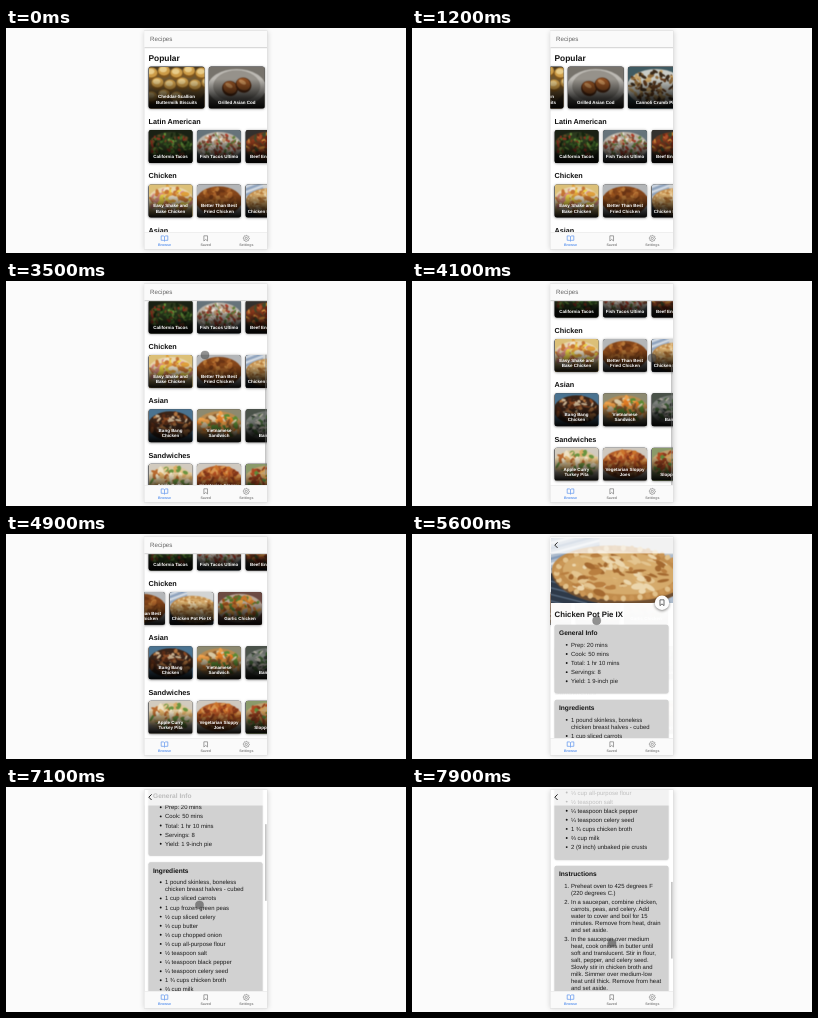
Write an HTML page with a canvas that moves like this. It is 400 px wide and 225 px high and loops after 8000 ms.

```html
<!DOCTYPE html>
<html lang="en">
<head>
<meta charset="utf-8">
<title>Recipes</title>
<style>
html, body { margin: 0; width: 100%; height: 100%; overflow: hidden; background: #fbfbfb; }
canvas { display: block; width: 400px; height: 225px; }
</style>
</head>
<body>
<canvas id="stage"></canvas>
<script>
const canvas = document.getElementById('stage');
const ratio = window.devicePixelRatio || 1;
canvas.width = 400 * ratio;
canvas.height = 225 * ratio;
let g = canvas.getContext('2d');
const FONT = '"Liberation Sans", Arial, sans-serif';
const LOOP = 8000, STEP = 100;
const LEFT = 138.5, TOP = 3, WIDTH = 122.5, BOTTOM = 204;

// label, backdrop, plate, piece size, food colours
const popular = [
  ['Cheddar-Scallion|Buttermilk Biscuits', '#4b3a20', '#6f5630', 'biscuits'],
  ['Grilled Asian Cod', '#77736c', '#bdbab4', 'cod'],
  ['Cannoli Crumb Pie', '#3f5a61', '#c9ccc6', 4, '#5f3a1c', '#8f6a3a', '#3a2a1a', '#c8a468'],
  ['French Onion Meatballs', '#41659a', '#d3d6d8', 7, '#dcc6a0', '#b48a5a', '#eceae2', '#a08060', '#cfd0cf'],
  ['Pork, Black Bean, and|Rice Casserole', '#55523e', '#8a6434', 2.4, '#e8bd3c', '#a8321f', '#5d7d2c', '#e0d2ac', '#2c1c14', '#d0802e']
];
const rows = [
  ['Latin American', [
    ['California Tacos', '#1a2114', '#2c3a1e', 3.2, '#2a4c1c', '#69963c', '#8f2c1e', '#6b4422', '#16240f', '#3d6526'],
    ['Fish Tacos Ultimo', '#66737a', '#b9b3a8', 3, '#e6e0d4', '#b03c28', '#62803c', '#c29a72', '#7f4a36'],
    ['Beef Enchiladas', '#33302e', '#6e3a20', 4, '#b0502a', '#d8903c', '#6b2414', '#3f4a2a', '#8f3a1c']
  ]],
  ['Chicken', [
    ['Easy Shake and|Bake Chicken', '#dcc078', '#e8d6ae', 5, '#dfa03c', '#c47434', '#ecd448', '#d98a80', '#efe4cc'],
    ['Better Than Best|Fried Chicken', '#b4b6b8', '#84451a', 5, '#8a4a1c', '#a9622a', '#6a3414', '#b87838', '#9a541e'],
    ['Chicken Pot Pie IX', '#56719a', '', 'pie'],
    ['Garlic Chicken', '#6b4a42', '#b9a89a', 4, '#c9762c', '#d99a45', '#9a4d1c', '#567a32']
  ]],
  ['Asian', [
    ['Bang Bang|Chicken', '#4a7390', '#3a2418', 4, '#8a4a24', '#b07440', '#5a2c16', '#c8b090', '#40281c'],
    ['Vietnamese|Sandwich', '#8d8a70', '#b88a50', 5, '#e07a24', '#eea04a', '#8a5a2c', '#d8c8a4', '#5a8a34'],
    ['Banh Mi', '#4a5249', '#7b7f7a', 4, '#3c5a32', '#6a6f6a', '#a9a59a', '#2c332c']
  ]],
  ['Sandwiches', [
    ['Apple Curry|Turkey Pita', '#d2cbbf', '#dcc8a0', 5, '#dcac66', '#b86a30', '#6a9440', '#efe2c4', '#e6c68c'],
    ['Vegetarian Sloppy|Joes', '#cfc9c0', '#b4602c', 4, '#b04c20', '#cc742c', '#86381a', '#d89450'],
    ['Sloppy Joes', '#8a9a6a', '#c0a070', 4, '#5f8a3a', '#b04a24', '#d09a50', '#8a3a1c']
  ]]
];
const info = ['Prep: 20 mins', 'Cook: 50 mins', 'Total: 1 hr 10 mins', 'Servings: 8', 'Yield: 1 9-inch pie'];
const ingredients = [
  '1 pound skinless, boneless|chicken breast halves - cubed', '1 cup sliced carrots',
  '1 cup frozen green peas', '½ cup sliced celery', '⅓ cup butter', '⅓ cup chopped onion',
  '⅓ cup all-purpose flour', '½ teaspoon salt', '¼ teaspoon black pepper',
  '¼ teaspoon celery seed', '1 ¾ cups chicken broth', '⅔ cup milk', '2 (9 inch) unbaked pie crusts'
];
const steps = [
  'Preheat oven to 425 degrees F|(220 degrees C.)',
  'In a saucepan, combine chicken,|carrots, peas, and celery. Add|water to cover and boil for 15|minutes. Remove from heat, drain|and set aside.',
  'In the saucepan over medium|heat, cook onions in butter until|soft and translucent. Stir in flour,|salt, pepper, and celery seed.|Slowly stir in chicken broth and|milk. Simmer over medium-low|heat until thick. Remove from heat|and set aside.',
  'Place the chicken mixture in|bottom pie crust. Pour hot liquid|mixture over.'
];

// Motion: time, value pairs
const popularX = [[400, 0], [500, 9], [800, 38], [1000, 45], [1200, 47], [1300, 49], [1600, 122], [1800, 154], [2100, 171], [2400, 176]];
const listY = [[3100, 0], [3500, 82.5], [3600, 94], [3800, 98.5]];
const chickenX = [[4100, 0], [4500, 58], [4700, 72], [4900, 76]];
const detailY = [[6700, 0], [7200, 112], [7300, 155], [7500, 200], [7600, 206], [7900, 241]];
const pointer = [
  [100, 200, 214], [400, 250, 62], [800, 206, 62], [1000, 245, 60], [1100, 270, 60], [1200, 272, 60],
  [1300, 252, 60], [1600, 172, 60], [1900, 185, 62], [2400, 189, 112], [2600, 191, 150], [2700, 193, 181],
  [2800, 195, 206], [3100, 197, 157], [3500, 199, 74], [3700, 205, 60], [4100, 240, 77], [4500, 180, 76],
  [4700, 245, 78], [4800, 270, 80], [4900, 272, 84], [5000, 256, 108], [5100, 222, 112], [5300, 186, 80],
  [5400, 186, 80], [5700, 184, 90], [6300, 178, 144], [6600, 186, 208], [7200, 195, 100], [7500, 198, 193], [7900, 200, 156]
];

function track(t, keys, k = 1) {
  if (t <= keys[0][0]) return keys[0][k];
  for (let i = 1; i < keys.length; i++) {
    const a = keys[i - 1], b = keys[i];
    if (t <= b[0]) return a[k] + (b[k] - a[k]) * (t - a[0]) / (b[0] - a[0]);
  }
  return keys[keys.length - 1][k];
}

function random(seed) {
  let s = seed * 7919 + 17;
  return () => (s = (s * 16807) % 2147483647) / 2147483647;
}

function text(str, x, y, size, color = '#111', weight = 'normal', align = 'left') {
  g.font = `${weight} ${size}px ${FONT}`;
  g.fillStyle = color;
  g.textAlign = align;
  g.fillText(str, x, y);
}

function rect(x, y, w, h, color) {
  g.fillStyle = color;
  g.fillRect(x, y, w, h);
}

function round(x, y, w, h, r) {
  g.beginPath();
  g.roundRect(x, y, w, h, r);
}

function oval(x, y, rx, ry, color, turn = 0) {
  g.beginPath();
  g.ellipse(x, y, rx, ry, turn, 0, Math.PI * 2);
  g.fillStyle = color;
  g.fill();
}

function line(points, color, width) {
  g.beginPath();
  points.forEach(([x, y]) => g.lineTo(x, y));
  g.strokeStyle = color;
  g.lineWidth = width;
  g.stroke();
}

function clipped(x, y, w, h, draw) {
  g.save();
  g.beginPath();
  g.rect(x, y, w, h);
  g.clip();
  draw();
  g.restore();
}

function shadow(blur, dy, alpha) {
  g.shadowColor = `rgba(0,0,0,${alpha})`;
  g.shadowBlur = blur * ratio;
  g.shadowOffsetY = dy * ratio;
}

function pie(w, h) {
  rect(0, 0, w, h, '#aebccd');
  for (let i = 0; i < 16; i++) {
    line([[0, h * i * .08], [w * .6, h * (i * .08 - .3)]], i % 2 ? '#dfe4ea' : '#8299b8', h * .035);
  }
  rect(w * .4, 0, w * .6, h * .25, '#d2d4d4');
  oval(0, h, w * .42, h * .45, '#2b3645', .3);
  for (let i = 0; i < 6; i++) {
    line([[0, h * (.66 + i * .1)], [w * .3, h * (.8 + i * .1)]], '#56697f', h * .02);
  }
  const cx = w * .56, cy = h * .54;
  oval(cx, cy + h * .04, w * .55, h * .45, '#6b4a2c', .06);
  oval(cx, cy, w * .55, h * .42, '#c08a48', .06);
  const rnd = random(5);
  for (let i = 0; i < 46; i++) {
    const a = i * Math.PI / 23;
    oval(cx + w * .51 * Math.cos(a), cy + h * .385 * Math.sin(a), w * .024, h * .04, i % 2 ? '#e2c18a' : '#c99452', a);
  }
  oval(cx, cy - h * .01, w * .46, h * .33, '#d4a868', .06);
  for (let i = 0; i < 110; i++) {
    const a = rnd() * 6.28, r = Math.sqrt(rnd());
    oval(cx + w * .45 * r * Math.cos(a), cy + h * .32 * r * Math.sin(a), w * (.015 + rnd() * .045),
      h * (.015 + rnd() * .035), ['#ecd6ac', '#b87c3c', '#d8ac6a', '#e4c48e', '#a2662c'][i % 5], rnd() * .9 - .2);
  }
}

function biscuits() {
  for (let i = 0; i < 13; i++) {
    const x = 3 + (i % 5) * 12.5 + (i / 5 & 1) * 6, y = 6 + (i / 5 | 0) * 12 - (i % 2) * 2;
    oval(x, y + 1.5, 6.3, 5.8, '#7f551c');
    oval(x, y, 5.9, 5, '#cd9c48');
    oval(x - .8, y - 1, 3.8, 2.8, '#e8cc8a');
  }
}

function cod(w, h) {
  oval(w * .5, h * .47, w * .42, h * .38, '#96928b');
  for (const [dx, dy] of [[.38, .5], [.62, .42]]) {
    const x = w * dx, y = h * dy;
    oval(x, y + 1, 8, 7.5, '#4d2711', .5);
    oval(x, y, 7, 6, '#8f4f22', .5);
    oval(x - 1, y - 2, 4, 2, '#c08a55', .5);
  }
}

function food([, backdrop, plate, size, ...colors], w, h, seed) {
  if (size === 'pie') return pie(w, h);
  rect(0, 0, w, h, backdrop);
  oval(w * .5, h * .5, w * .52, h * .44, plate);
  if (size === 'biscuits') return biscuits();
  if (size === 'cod') return cod(w, h);
  const rnd = random(seed);
  for (let i = 0; i < 420 / size; i++) {
    const a = rnd() * 6.28, r = Math.sqrt(rnd());
    oval(w * (.5 + .47 * r * Math.cos(a)), h * (.48 + .38 * r * Math.sin(a)),
      size * (.4 + rnd() * .5), size * (.2 + rnd() * .3), colors[i % colors.length], rnd() * 3);
  }
}

// Renders a dish once, slightly softened, and keeps it
const photos = new Map();
function photo(item, w, h, seed) {
  const key = item[0] + w;
  if (photos.has(key)) return photos.get(key);
  const scale = 2 * ratio;
  const [sharp, soft] = [0, 1].map(() => {
    const c = document.createElement('canvas');
    c.width = w * scale;
    c.height = h * scale;
    return c;
  });
  const main = g;
  g = sharp.getContext('2d');
  g.scale(scale, scale);
  food(item, w, h, seed);
  g = main;
  const s = soft.getContext('2d');
  s.drawImage(sharp, 0, 0);
  s.filter = `blur(${.6 * scale}px)`;
  s.drawImage(sharp, 0, 0);
  photos.set(key, soft);
  return soft;
}

function card(item, x, y, w, h, seed) {
  if (x > LEFT + WIDTH + 3 || x + w < LEFT - 3 || y > BOTTOM || y + h < 15) return;
  g.save();
  shadow(2.5, .6, .5);
  round(x, y, w, h, 2.5);
  g.fillStyle = '#222';
  g.fill();
  g.restore();
  g.save();
  round(x, y, w, h, 2.5);
  g.clip();
  g.drawImage(photo(item, w, h, seed), x, y, w, h);
  const shade = g.createLinearGradient(0, y, 0, y + h);
  shade.addColorStop(.3, 'rgba(0,0,0,0)');
  shade.addColorStop(.75, 'rgba(0,0,0,.72)');
  shade.addColorStop(1, 'rgba(0,0,0,.97)');
  rect(x, y, w, h, shade);
  g.restore();
  const lines = item[0].split('|');
  lines.forEach((str, i) => text(str, x + w / 2, y + h - 4.9 - (lines.length - 1 - i) * 5.3, 4.5, '#fff', 'bold', 'center'));
}

function scrollbar(top, view, total, offset) {
  rect(259.3, top + offset * view / total, 1.2, view * view / total, 'rgba(120,120,120,.6)');
}

function listPage(t) {
  const dy = track(t, listY);
  rect(LEFT, TOP, WIDTH, 201, '#fff');
  clipped(LEFT, 20, WIDTH, BOTTOM - 20, () => {
    text('Popular', 142.5, 32.6 - dy, 8.4, '#111', 'bold');
    popular.forEach((item, i) => card(item, 142.5 + i * 60.2 - track(t, popularX), 38.5 - dy, 56, 42, i + 1));
    rows.forEach(([title, items], r) => {
      const y = 96 + r * 54.4 - dy;
      const dx = title === 'Chicken' ? track(t, chickenX) : 0;
      text(title, 142.5, y, 7.25, '#111', 'bold');
      items.forEach((item, i) => card(item, 142.5 + i * 48.5 - dx, y + 6, 44, 33, r * 7 + i + 11));
    });
    if (t >= 3100 && t < 4200) scrollbar(20, 184, 282.5, dy);
  });
  rect(LEFT, TOP, WIDTH, 16.5, '#fafafa');
  rect(LEFT, 19.2, WIDTH, 1, '#d2d2d2');
  text('Recipes', 144, 13.4, 6.2, '#666');
}

function bookmark(x, y, s, color, width) {
  line([[x - s * .7, y - s], [x + s * .7, y - s], [x + s * .7, y + s], [x, y + s * .4], [x - s * .7, y + s], [x - s * .7, y - s]], color, width);
}

function panel(title, y, h) {
  g.save();
  shadow(1.5, .4, .18);
  round(142.5, y, 114, h, 2);
  g.fillStyle = '#d1d1d1';
  g.fill();
  g.restore();
  text(title, 147, y + 10.5, 6.6, '#111', 'bold');
}

function items(list, y, numbered) {
  list.forEach((entry, n) => {
    if (numbered) text(n + 1 + '.', 157.3, y, 5.95, '#1a1a1a', 'normal', 'right');
    else oval(154.7, y - 2, .95, .95, '#111');
    entry.split('|').forEach((str, i) => {
      if (i) y += 7;
      text(str, 159, y, 5.95, '#1a1a1a');
    });
    y += 9.1;
  });
}

function detailPage(t) {
  const dy = track(t, detailY);
  const p = Math.min(1, (t - 5400) / 280);
  const ease = 1 - (1 - p) ** 3;
  clipped(LEFT, TOP, WIDTH, 201, () => {
    g.globalAlpha = ease;
    g.translate(0, 40 * (1 - ease));
    rect(LEFT, TOP, WIDTH, 201, '#fff');
    g.save();
    g.translate(0, -dy);
    g.drawImage(photo(rows[1][1][2], WIDTH, 65.5), LEFT, TOP, WIDTH, 65.5);
    g.save();
    shadow(3, 1, .5);
    oval(250, 67.8, 7.2, 7.2, '#fff');
    g.restore();
    bookmark(250, 67.8, 2.9, '#444', .8);
    text('Chicken Pot Pie IX', 142.5, 81.6, 7.8, '#111', 'bold');
    panel('General Info', 89.8, 68.5);
    items(info, 111.9);
    panel('Ingredients', 164.8, 149);
    items(ingredients, 186.9);
    panel('Instructions', 319.8, 204);
    items(steps, 342.2, true);
    g.restore();
    rect(LEFT, TOP, WIDTH, 15.5, 'rgba(255,255,255,.72)');
    line([[145.6, 7.4], [142.8, 10.2], [145.6, 13]], '#222', 1);
    if (t >= 6700) scrollbar(TOP, 201, 527, dy);
  });
}

function tabs() {
  rect(LEFT, BOTTOM, WIDTH, 17, '#fafafa');
  rect(LEFT, BOTTOM, WIDTH, .5, '#e2e2e2');
  const blue = '#5c94ee', grey = '#858585';
  line([[158.5, 208.6], [157.3, 207.9], [155.2, 207.9], [155.2, 212.3], [157.3, 212.3], [158.5, 213.1],
    [159.7, 212.3], [161.8, 212.3], [161.8, 207.9], [159.7, 207.9], [158.5, 208.6], [158.5, 213]], blue, .7);
  bookmark(199.7, 210.4, 2.6, grey, .75);
  g.beginPath();
  for (let i = 0; i <= 32; i++) {
    const a = i * Math.PI / 16, r = i % 4 < 2 ? 3.1 : 2.5;
    g.lineTo(240.3 + r * Math.cos(a), 210.4 + r * Math.sin(a));
  }
  g.strokeStyle = grey;
  g.lineWidth = .7;
  g.stroke();
  g.beginPath();
  g.arc(240.3, 210.4, 1.1, 0, 7);
  g.stroke();
  text('Browse', 158.5, 217.6, 3.6, blue, 'bold', 'center');
  text('Saved', 199.7, 217.6, 3.6, grey, 'bold', 'center');
  text('Settings', 240.3, 217.6, 3.6, grey, 'bold', 'center');
}

function cursor(t) {
  if (t < 100) return;
  clipped(LEFT, TOP, WIDTH, 218, () => {
    oval(track(t, pointer, 1), track(t, pointer, 2), 4.1, 4.1, 'rgba(75,75,75,.6)');
    g.strokeStyle = 'rgba(60,60,60,.35)';
    g.lineWidth = .6;
    g.stroke();
  });
}

function draw(t) {
  g.setTransform(ratio, 0, 0, ratio, 0, 0);
  g.textRendering = 'geometricPrecision';
  rect(0, 0, 400, 225, '#fbfbfb');
  g.save();
  shadow(5, 0, .16);
  rect(138, 2.5, 123.5, 219, '#e0e0e0');
  g.restore();
  if (t < 5700) listPage(t);
  if (t >= 5500) detailPage(t);
  tabs();
  cursor(t);
}

const start = performance.now();
let last = -1;
function tick() {
  const n = Math.floor((performance.now() - start) % LOOP / STEP);
  if (n !== last) draw(n * STEP);
  last = n;
  requestAnimationFrame(tick);
}
tick();
</script>
</body>
</html>
```
